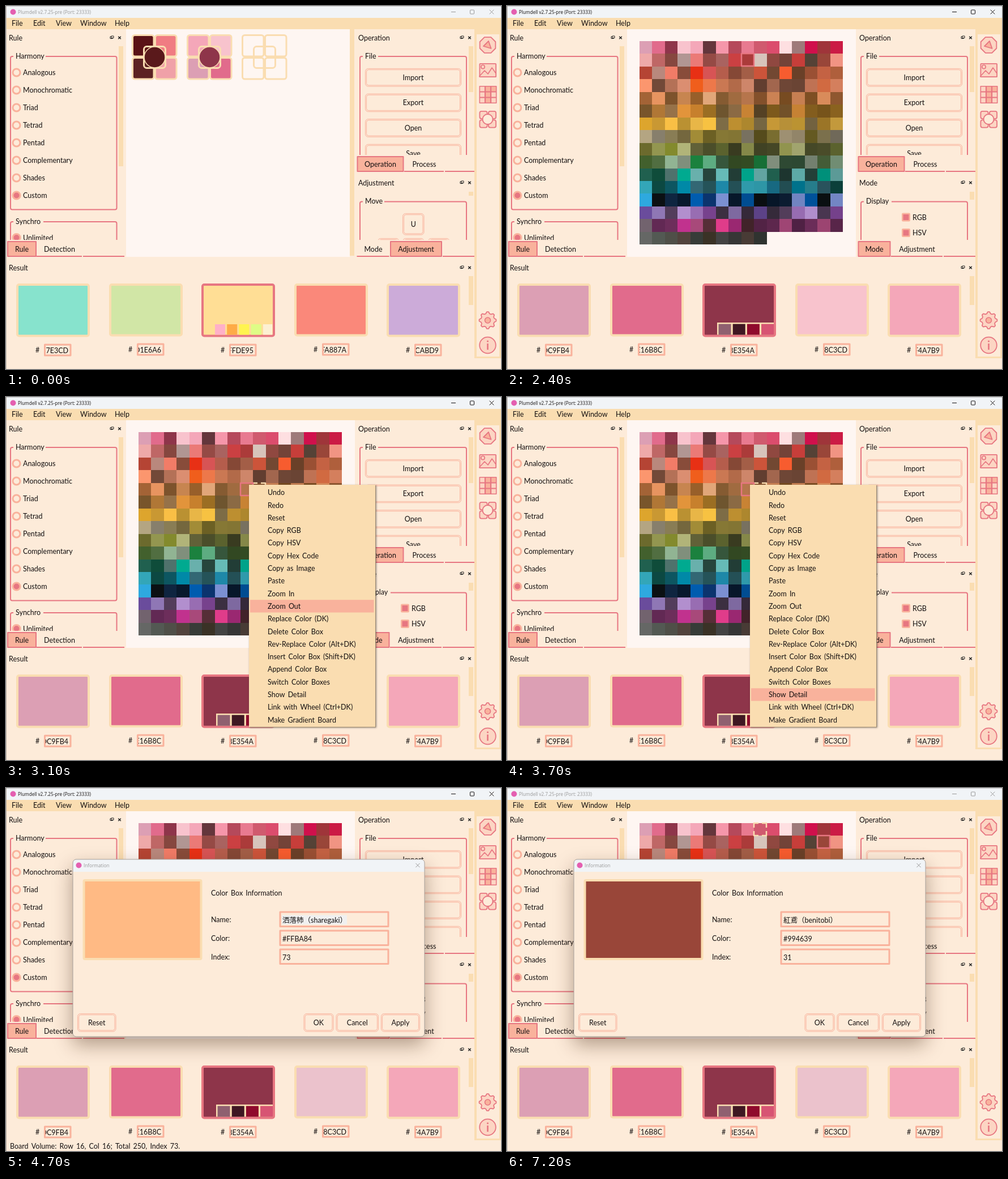
Write an HTML page with a canvas that moves like this. It is 874 px wide and 641 px high and loops after 7300 ms.

```html
<!DOCTYPE html>
<html lang="en">
<head>
<meta charset="utf-8">
<title>Plumdell</title>
<style>
  html, body { margin: 0; width: 874px; height: 641px; overflow: hidden; }
  canvas { display: block; }
</style>
</head>
<body>
<canvas id="stage" width="874" height="641"></canvas>
<script>
const ctx = document.getElementById('stage').getContext('2d');
const LOOP = 7300;
const BG = '#fdebd9', CREAM = '#faddb1', PEACH = '#f9b29c', PINK = '#e77681',
      PALE = '#fcd5c3', PAPER = '#fef6f2', INK = '#141010', TITLE = '#f1f4f7';
const BODY = "12.5px Lato, 'Noto Sans CJK JP', 'Noto Sans CJK', sans-serif";
const SMALL = "8.2px 'Open Sans', sans-serif";

// Full rows at the top, then a few tones per row that repeat with seeded variation.
const TONES = [
  'dc9fb4 e16b8c 8e354a f8c3cd f4a7b9 64363c f596aa b5495b e87a90 d05a6e db4d6d fedfe1 9e7a7a d0104c 9f353a cb1b45',
  'eea9a9 bf6766 86473f b19693 eb7a77 954a45 a96360 cb4042 ab3b3a d7c4bb 904840 734338 c73e3a 554236 994639 f19483',
  'b54434 b9887d f17c67 884c3a e83015 d75455 b55d4c 854836 a35e47 cc543a 724832 f75c2f 6a4028 9a5034 c46243 af5f3c',
  'fb966e 724938 b47157 db8e71 f05e1c ed784a ca7853',
  'a36336 e79460 7d532c c78550 985f2a e1a679 855b32',
  '78552b b07736 967249 e2943b c7802d 9b6e23 6e552f',
  'dda52d c99833 f9bf45 ba9132 e8b647 f7c242 7d6c46',
  'b4a582 877f6c 897d55 74673e a28c37 6c6024 867835',
  '6c6a2d 939650 838a2d b1b479 616138 4b4e2a 5b622e',
  '42602d 516e41 91b493 808f7c 1b813e 5dac81 36563c',
  '20604f 0f4c3a 4f726c 00aa90 69b0ac 26453d 66bab7',
  '33a6b8 0c4842 0d5661 0089a7 336774 255359 1e88a8',
  '2ea9df 0b1013 0f2540 08192d 005caf 0b346e 7b90d2',
  '6a4c9c 8f77b5 533d5b b28fce 986db2 77428d 3c2f41',
  '72636e 622954 6d2e5b c1328e a8497a 562e37 e03c8a',
  '656765 535953 4f4f48 52433d 373c38 3a3226 434343'
].map(row => row.split(' '));

const MENU = ['Undo', 'Redo', 'Reset', 'Copy RGB', 'Copy HSV', 'Copy Hex Code', 'Copy as Image',
  'Paste', 'Zoom In', 'Zoom Out', 'Replace Color (DK)', 'Delete Color Box',
  'Rev-Replace Color (Alt+DK)', 'Insert Color Box (Shift+DK)', 'Append Color Box',
  'Switch Color Boxes', 'Show Detail', 'Link with Wheel (Ctrl+DK)', 'Make Gradient Board'];
const SWATCHES = {
  72: ['洒落柿（sharegaki）', '#FFBA84'],
  19: ['桜鼠（sakuranezumi）', '#B19693'],
  9: ['今様（imayoh）', '#D05A6E'],
  30: ['紅鳶（benitobi）', '#994639']
};
const SETS = [
  ['#5a1216', '#f07c82', '#5c2223', '#f0a1a8', '#5a191b'],
  ['#f4a7b9', '#f8c3cd', '#dc9fb4', '#e16b8c', '#8e354a'],
  null
];

// Value of the last [time, value] step reached.
const step = (t, ...steps) => steps.reduce((v, [at, next]) => t >= at ? next : v, undefined);
const boardStatus = i => `Board Volume: Row 16, Col 16; Total 250, Index ${i + 1}.`;
const random = n => { const v = Math.sin(n * 12.9898) * 43758.5453; return v - Math.floor(v); };

function text(s, x, y, { align = 'left', color = INK, font = BODY } = {}) {
  ctx.font = font;
  ctx.wordSpacing = font === BODY ? '2px' : '0px';
  ctx.textAlign = align;
  ctx.fillStyle = color;
  ctx.fillText(s, x, y + (font === BODY ? 4.5 : 3));
}

function fill(x, y, w, h, color) {
  ctx.fillStyle = color;
  ctx.fillRect(x, y, w, h);
}

function box(x, y, w, h, inside, edge, width = 2, radius = 3) {
  const d = edge ? width / 2 : 0;
  ctx.beginPath();
  ctx.roundRect(x + d, y + d, w - 2 * d, h - 2 * d, radius);
  paint(inside, edge, width);
}

function paint(inside, edge, width = 2) {
  if (inside) { ctx.fillStyle = inside; ctx.fill(); }
  if (edge) { ctx.strokeStyle = edge; ctx.lineWidth = width; ctx.stroke(); }
}

function circle(x, y, r, inside, edge, width) {
  ctx.beginPath();
  ctx.arc(x, y, r, 0, 2 * Math.PI);
  paint(inside, edge, width);
}

function path(points, inside, edge, width, open) {
  ctx.beginPath();
  points.forEach(([x, y]) => ctx.lineTo(x, y));
  if (!open) ctx.closePath();
  paint(inside, edge, width);
}

function clip(x, y, w, h, draw) {
  ctx.save();
  ctx.beginPath();
  ctx.rect(x, y, w, h);
  ctx.clip();
  draw();
  ctx.restore();
}

function cross(x, y, r, color, width) {
  path([[x - r, y - r], [x + r, y + r]], null, color, width, true);
  path([[x - r, y + r], [x + r, y - r]], null, color, width, true);
}

function button(label, x, y, w, h) {
  box(x, y, w, h, null, PEACH, 1, 5);
  box(x + 2, y + 2, w - 4, h - 4, null, PEACH, 1, 3.5);
  text(label, x + w / 2, y + h / 2, { align: 'center' });
}

function group(label, x, y, w, h, labelWidth) {
  box(x, y, w, h, null, PINK, 2, 3);
  fill(x + 6, y - 3, labelWidth + 7, 8, BG);
  text(label, x + 10, y);
}

function dockTitle(label, x, y, right) {
  text(label, x, y);
  box(right - 17, y - 2.5, 5, 4.5, null, '#222', 1, 0);
  box(right - 15, y - 3.5, 5, 4.5, BG, '#222', 1, 0);
  cross(right, y, 2.3, '#222', 1.4);
}

function tabs(items, y, end) {
  items.forEach(([label, x, w, active]) => {
    if (active) box(x, y, w, 28, PEACH, PINK, 2, 0);
    else fill(x, y + 26, w - 1, 2, PINK);
    text(label, x + w / 2, y + 14, { align: 'center' });
  });
  const [, x, w] = items[items.length - 1];
  fill(x + w + 1, y + 26, end - x - w - 1, 2, PINK);
}

function radio(label, y, on) {
  circle(18.5, y, 6.5, on ? PINK : BG, PEACH, 3);
  text(label, 30, y);
}

function checkbox(label, y) {
  box(697, y - 7.5, 15, 15, PINK, PEACH, 2.5, 1);
  text(label, 716, y);
}

function titleBar(active) {
  const color = active ? INK : '#999';
  fill(0, 0, 874, 21, TITLE);
  fill(0, 0, 874, 1, '#c9c9c9');
  circle(12.5, 10.5, 5, '#e45fb0');
  text('Plumdell v2.7.25-pre (Port: 23333)', 21, 10.5, { font: SMALL, color });
  fill(786, 10, 8, 1, color);
  box(819, 6.5, 8, 8, null, color, 1, 1);
  cross(857.5, 10.5, 3.8, color, 1);
}

function ruleDock() {
  dockTitle('Rule', 5, 56, 200.5);
  clip(0, 66, 211, 347, () => {
    group('Harmony', 7, 88, 189.5, 272.5, 50);
    ['Analogous', 'Monochromatic', 'Triad', 'Tetrad', 'Pentad', 'Complementary', 'Shades', 'Custom']
      .forEach((label, i) => radio(label, 117.5 + 31 * i, i === 7));
    group('Synchro', 7, 380, 189.5, 90, 46);
    radio('Unlimited', 409, true);
  });
  fill(199, 71, 8, 212, CREAM);
  tabs([['Rule', 2, 52, true], ['Detection', 54, 81]], 415, 209);
}

function operationDock() {
  dockTitle('Operation', 622, 56, 818.5);
  clip(616, 66, 211, 197, () => {
    group('File', 624, 88, 190, 260, 20);
    ['Import', 'Export', 'Open', 'Save'].forEach((label, i) => button(label, 634, 110 + 44.6 * i, 170, 32.5));
  });
  fill(817, 71, 8, 81, CREAM);
  tabs([['Operation', 619.5, 83, true], ['Process', 703, 71]], 265, 827);
}

function adjustmentDock(board) {
  dockTitle(board ? 'Mode' : 'Adjustment', 622, 312, 818.5);
  clip(616, 322, 211, 91, () => {
    group(board ? 'Display' : 'Move', 624, 344.5, 190, 150, board ? 42 : 31);
    if (board) {
      checkbox('RGB', 373);
      checkbox('HSV', 400.5);
    } else {
      button('U', 700, 366, 38.5, 38.5);
      [656, 700, 745].forEach(x => button('', x, 410, 38.5, 38.5));
    }
  });
  fill(817, 328, 8, board ? 14 : 7, CREAM);
  tabs([['Mode', 619.5, 58, board], ['Adjustment', 678, 92, !board]], 415, 827);
}

function depot(selected) {
  fill(212, 41, 395, 402, PAPER);
  fill(607, 41, 8, 400, CREAM);
  SETS.forEach((colors, n) => {
    const x = 222 + 97 * n, y = 50, on = selected && n === 1, edge = on ? PINK : CREAM;
    if (on) box(x - 9, y - 7, 93, 94, BG, PINK, 3, 10);
    for (let i = 0; i < 4; i++)
      box(x + 40 * (i % 2), y + 40 * (i >> 1), 40.5, 40.5, colors && colors[i], edge, 3, 4);
    box(x + 20, y + 20, 41, 41, null, edge, 3, 5);
    if (colors) circle(x + 40.5, y + 40.5, 18.5, colors[4], edge, 1.5);
  });
}

// Cell edges fall on whole pixels so that neighbours meet without a seam.
const edge = (start, n) => Math.round(start + 22.45 * n);

function mark(i, color, dashed) {
  if (i === null) return;
  ctx.setLineDash(dashed ? [16, 6] : []);
  ctx.lineDashOffset = 8;
  ctx.strokeStyle = color;
  ctx.lineWidth = 2.5;
  ctx.strokeRect(edge(234, i % 16), edge(62, i >> 4), 22, 22);
  ctx.setLineDash([]);
}

function board(selected, previous) {
  fill(212, 41, 404, 402, PAPER);
  for (let i = 0; i < 250; i++) {
    const col = i % 16, line = i >> 4, row = TONES[line], listed = col < row.length;
    const x = edge(234, col), y = edge(62, line);
    const w = edge(234, col + 1) - x, h = edge(62, line + 1) - y;
    fill(x, y, w, h, '#' + row[listed ? col : Math.floor(random(i) * row.length)]);
    if (!listed) fill(x, y, w, h, `rgba(0,0,0,${random(i + 400) * 0.25})`);
  }
  mark(previous, CREAM, true);
  mark(selected, PINK);
}

function results(colors, shades, framed) {
  dockTitle('Result', 5, 462, 818.5);
  fill(817, 477, 8, 51, CREAM);
  colors.forEach(([code, shown = code], i) => {
    const x = Math.round(18 + 163.5 * i), lift = i % 2;
    box(x, 490, 130, 94.5 - lift, '#' + shown, i === 2 ? PINK : CREAM, 4, 3);
    text('#', x + 34, 607.5 - lift);
    box(x + 49, 596.5 - lift, 48.5, 22, BG, PEACH, 3, 0);
    clip(x + 52, 598, 43, 19, () => text(code, x + 92, 608 - lift, { align: 'right' }));
  });
  if (framed) fill(371, 559, 100, 21.5, CREAM);
  shades.forEach((color, i) => framed
    ? fill(373.5 + 25.2 * i, 561.5, 22, 19, color)
    : fill(369 + 21.2 * i, 562, i === 4 ? 16.5 : 18, 18.5, color));
}

function sideBar(hover) {
  const c = 850.5;
  fill(827, 41, 47, 581, CREAM);
  fill(831, 50, 40, 569, BG);
  if (hover) fill(831, 137, 40, 39, CREAM);
  ctx.lineJoin = 'round';
  const ring = (y, count, radius) => Array.from({ length: count }, (_, k) => {
    const a = (k + 0.5) / count * 2 * Math.PI;
    return [c + radius(k) * Math.cos(a), y + radius(k) * Math.sin(a)];
  });
  path(ring(69, 8, () => 15), PALE, PINK, 1.8);
  path([[843, 71], [852, 62], [856.5, 75]], PEACH, PINK, 1.8);

  box(835.5, 101, 30.5, 25, PALE, PINK, 1.8, 1);
  path([[836, 124], [845, 114], [851, 120], [858, 109], [865, 119], [865, 125], [836, 125]], PALE, PINK, 1.6);
  circle(842, 107.5, 3.2, PALE, PINK, 1.6);

  for (let i = 0; i < 9; i++)
    box(835.5 + 10 * (i % 3), 141 + 10 * Math.floor(i / 3), 11, 11, i % 3 === 1 || i === 2 ? PEACH : PALE, PINK, 1.6, 0);

  for (let i = 0; i < 4; i++)
    box(835.5 + 15.5 * (i % 2), 185 + 15.5 * (i >> 1), 15, 15, PALE, PINK, 1.8, 3);
  circle(c, 200, 9, BG, PINK, 1.8);

  path(ring(555, 32, k => (k + 1) % 4 < 2 ? 15 : 12), PALE, PINK, 1.8);
  circle(c, 555, 5, PEACH, PINK, 1.6);

  circle(c, 599, 14.3, PALE, PINK, 1.8);
  circle(c, 592, 1.6, PINK);
  fill(c - 1.3, 596, 2.6, 11, PINK);
}

function contextMenu(active) {
  ctx.save();
  ctx.shadowColor = 'rgba(0,0,0,.4)';
  ctx.shadowBlur = 3;
  ctx.shadowOffsetX = ctx.shadowOffsetY = 1;
  fill(429, 155, 223.5, 428, CREAM);
  ctx.restore();
  fill(652, 156, 1, 427, '#9b8a74');
  fill(430, 582.5, 223, 1, '#9b8a74');
  MENU.forEach((label, i) => {
    const y = 168.7 + 22.3 * i;
    if (i === active) fill(431, y - 11.2, 218.5, 22.3, PEACH);
    text(label, 462, y);
  });
}

function dialog(t, index, scale, alpha) {
  const active = t < 4700, color = active ? INK : '#999', [name, hex] = SWATCHES[index];
  ctx.save();
  ctx.globalAlpha = alpha;
  ctx.translate(428.5, 282.5);
  ctx.scale(scale, scale);
  ctx.translate(-428.5, -282.5);
  ctx.save();
  ctx.shadowColor = 'rgba(60,30,10,.4)';
  ctx.shadowBlur = 34;
  ctx.shadowOffsetY = 14;
  box(118, 126, 621, 313, BG, null, 0, 6);
  ctx.restore();
  ctx.beginPath();
  ctx.roundRect(118, 126, 621, 22, [6, 6, 0, 0]);
  paint(TITLE);
  box(117.5, 125.5, 622, 314, null, '#a8a19b', 1, 6);
  circle(128.5, 136.5, 5, '#e45fb0');
  text('Information', 137, 136.5, { font: SMALL, color });
  cross(727, 136.5, 3.6, color, 1);

  box(135.5, 161, 211, 143, hex, CREAM, 4, 2);
  text('Color Box Information', 362, 185);
  [['Name:', name], ['Color:', hex], ['Index:', String(index + 1)]].forEach(([label, value], i) => {
    const y = 232 + 33 * i, first = i === 0;
    text(label, 362, y);
    box(482.5, y - 14.5, 194, 28.5, BG, first && active ? PINK : PEACH, 3, 0);
    const marked = first && t < 5200;
    if (marked) {
      ctx.font = BODY;
      const w = ctx.measureText(value).width;
      fill(487, y - 7.5, w + 1, 16.5, active ? '#0078d7' : '#f0f0f0');
      if (t < 4500) fill(488 + w, y - 7.5, 1, 16.5, INK);
    }
    text(value, 488, y + 1, { color: marked && active ? '#fff' : INK });
  });
  button('Reset', 126, 398, 68.5, 32.5);
  button('OK', 525.5, 398, 53, 32.5);
  button('Cancel', 582.5, 398, 75.5, 32.5);
  button('Apply', 662, 398, 69, 32.5);
  ctx.restore();
}

function draw(t) {
  const onBoard = t >= 1900;
  const activeWindow = step(t, [0, false], [500, true], [4000, false], [4700, true], [7200, false]);
  const status = step(t, [0, ''], [600, 'Depot Volume: Row 3, Col 3; Total 2, Index 2.'],
    [1800, 'Switch to the board view.'], [2400, ''], [2500, boardStatus(73)], [2600, boardStatus(72)],
    [2700, ''], [4000, boardStatus(72)], [5200, boardStatus(19)], [5600, boardStatus(9)],
    [6100, boardStatus(30)], [6500, '']);
  const [selected, previous] = step(t, [0, [null, null]], [2400, [24, null]], [2500, [73, 24]],
    [2600, [72, 73]], [5200, [19, 72]], [5500, [9, 19]], [6100, [30, 9]]);

  fill(0, 0, 874, 641, BG);
  titleBar(activeWindow);
  fill(0, 21, 874, 20, CREAM);
  [['File', 10], ['Edit', 48], ['View', 88], ['Window', 131], ['Help', 192]]
    .forEach(([label, x]) => text(label, x, 30.5));
  ruleDock();
  if (onBoard) board(selected, previous);
  else depot(t >= 600);
  operationDock();
  adjustmentDock(onBoard);
  if (t < 700) {
    results([['87E3CD'], ['D1E6A6'], ['FFDE95'], ['FA887A'], ['CCABD9']],
      ['#ffb0c8', '#feab47', '#fff44f', '#dffc86', '#fdf0d2']);
  } else {
    results([['DC9FB4'], ['E16B8C'], ['8E354A'], ['F8C3CD', t < 4000 ? 'f8c3cd' : 'ebc2cc'], ['F4A7B9']],
      ['#8f6070', '#3f1722', '#8f0a2c', '#d75473'], true);
  }
  sideBar(t >= 1800 && t < 2400);
  text(status, 7, 632.5);
  fill(0, 0, 1, 641, activeWindow ? '#b9aea5' : '#c8bfb7');

  if (t >= 2600 && t < 4000) {
    contextMenu(step(t, [0, -1], [2700, 0], [2800, 2], [2900, 4], [3000, 7], [3100, 9],
      [3200, 11], [3300, 13], [3400, 14], [3500, 15], [3700, 16]));
  }
  if (t >= 4000) {
    const index = step(t, [0, 72], [5200, 19], [5500, 9], [6100, 30]);
    const [scale, alpha] = step(t, [4000, [0.95, 0.4]], [4100, [0.989, 1]], [4200, [1, 1]]);
    dialog(t, index, scale, alpha);
  }
}

function tick() {
  draw(performance.now() % LOOP);
  requestAnimationFrame(tick);
}
tick();
</script>
</body>
</html>
```
